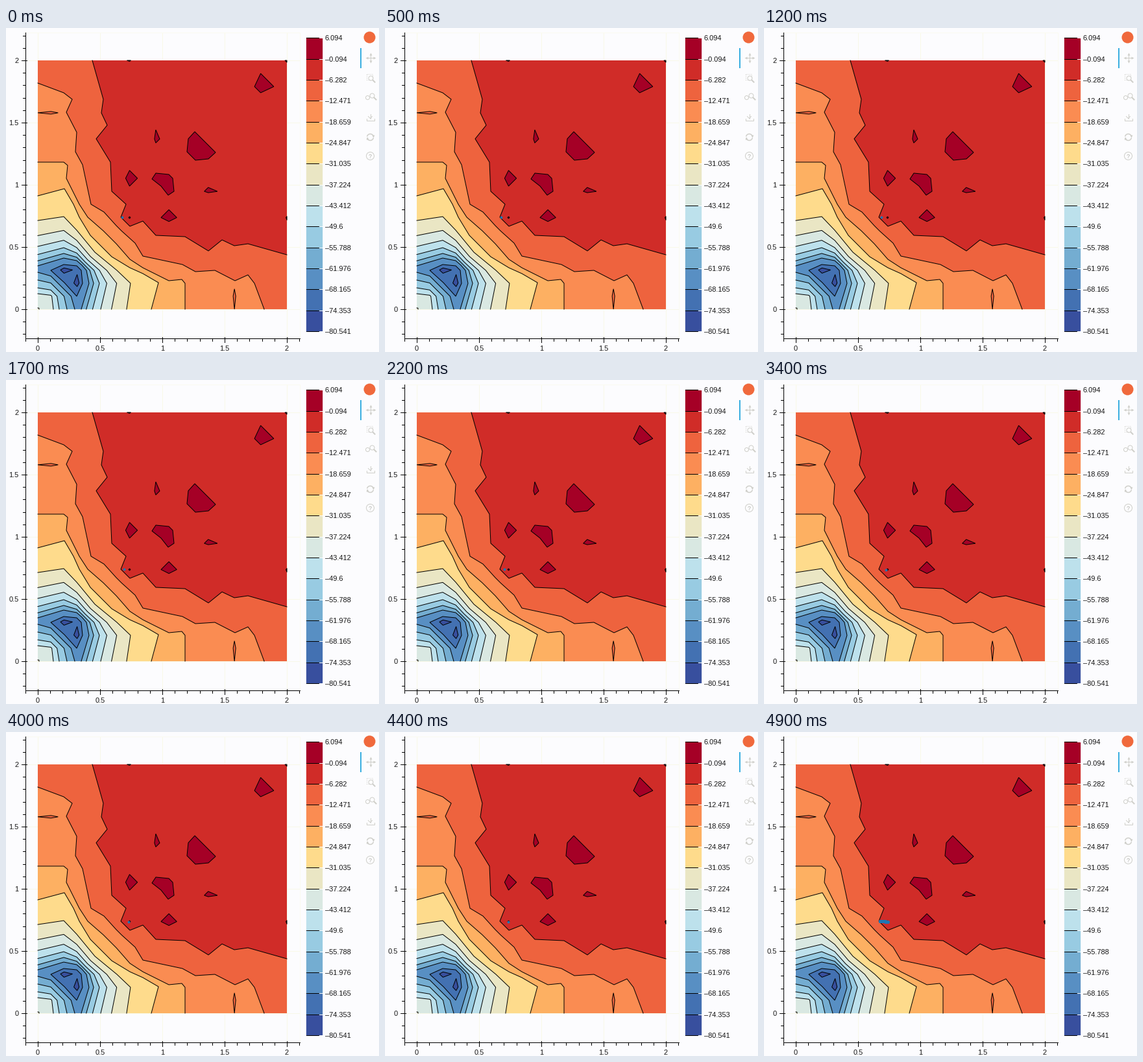
A matplotlib script that plays this animation: 575 by 500 pixels, repeating every 5 s.

```python
import numpy as np
import matplotlib.pyplot as plt
from matplotlib.animation import FuncAnimation
from matplotlib.patches import Circle, Polygon, Rectangle

W, H, DPI = 575, 500, 100
FRAMES, INTERVAL = 50, 100
PX = 72 / DPI
X0, Y0, SIZE = 48.5, 433.5, 384      # data origin and side of the plot in pixels
CELL = SIZE / 19                     # the field is sampled on 20 x 20 nodes
LOW, HIGH = -80.541, 6.094
LEVELS = np.linspace(LOW, HIGH, 15)
PALETTE = ("#384f9e #4371b2 #588fc3 #74add1 #98cbe2 #bde1ec #d9e8e2 "
           "#eae6c4 #fedb8c #fdb062 #fa8c52 #ee633e #d02c28 #a50026").split()
BACK, GREY, INK = "#fcfcfe", "#cfcfca", "#151515"

fig = plt.figure(figsize=(W / DPI, H / DPI), dpi=DPI, facecolor=BACK)
ax = fig.add_axes([0, 0, 1, 1])
ax.set_xlim(-0.5, W - 0.5)
ax.set_ylim(H - 0.5, -0.5)
ax.axis("off")


def line(xs, ys, color="black", width=1, z=3, **kw):
    ax.plot(xs, ys, color=color, lw=width * PX, zorder=z, **kw)


def label(x, y, text, ha, size=11, color=INK):
    ax.text(x, y, text, ha=ha, va="center_baseline", color=color,
            fontsize=size * PX, family="Liberation Sans", zorder=5)


def to_stage(points):
    """Offsets from the origin, y upwards, to stage pixels inside the plot."""
    points = np.clip(np.array(points, float), 0, SIZE)
    return np.column_stack([X0 + points[:, 0], Y0 - points[:, 1]])


def mirror(half):
    """Complete a path that is symmetric about the diagonal."""
    half = [tuple(p) for p in half]
    return half + [(y, x) for x, y in reversed(half)]


def blob(points, color_index):
    ax.add_patch(Polygon(to_stage(points), fc=PALETTE[color_index],
                         ec="black", lw=PX, zorder=2))


def contour(half, color_index):
    """Outline a symmetric level line and fill everything towards the origin."""
    path = mirror(half)
    inside = path + [(path[-1][0], 0), (0, 0), (0, path[0][1])]
    ax.add_patch(Polygon(to_stage(inside), fc=PALETTE[color_index], ec="none", zorder=2))
    line(*to_stage(path).T, z=2)


def kite(col, row, arms, color_index):
    """Level line around one node, and its twin across the diagonal."""
    up, right, down, left = np.array(arms) * CELL
    x, y = col * CELL, row * CELL
    points = [(x, y + up), (x + right, y), (x, y - down), (x - left, y)]
    blob(points, color_index)
    if col != row:
        blob([(b, a) for a, b in points], color_index)


# Grid and frame
for p in np.arange(5) * SIZE / 4:
    line([X0 + p] * 2, [6, 478], "#f8f8e8", z=1)
    line([29, 452], [Y0 - p] * 2, "#f8f8e8", z=1)
line([29, 452, 452], [6, 6, 478], "#fafaf0", z=1)

# Plateau and the ragged slopes around it, half of each line
ax.add_patch(Rectangle((X0, Y0 - SIZE), SIZE, SIZE, fc=PALETTE[12], ec="none", zorder=2))
contour([(84, 384), (101, 324), (98, 303), (107, 284), (90, 263), (112, 227),
         (114, 182), (136, 162), (128, 142)], 11)
contour([(0, 349), (40, 334), (53, 324), (44, 304), (60, 273), (58, 243),
         (69, 223), (82, 162), (102, 150), (121, 129)], 10)
contour([(0, 227), (40, 227), (46, 222), (44, 202), (64, 162), (77, 142),
         (101, 121)], 9)
contour([(0, 175), (41, 186), (55, 162), (64, 142), (81, 114)], 8)

# Inside the well the field falls off as 1/r along the axes
INNER = np.array([(0, 67), (40, 79), (60, 75), (68, 68)])
OUTER = np.array([(0, 137), (40, 143), (60, 122), (88, 88)])
for index in range(7, 1, -1):
    reach = 4330 / -LEVELS[index + 1]
    t = (reach - 69.9) / 69.7
    contour(INNER + t * (OUTER - INNER), index)

# It rises again towards the origin
for index, reach in enumerate((57, 45, 33, 24, 2), start=3):
    contour([(0, reach), (min(20, 0.9 * reach), 0.9 * reach)], index)

blob(mirror([(41, 41), (20, 60), (40, 69), (60, 67)]), 1)
kite(2, 3, (0.15, 0.65, 0.25, 0.27), 0)

# Isolated peaks
kite(1, 15, (0.1, 0.55, 0.1, 1), 11)
kite(17, 17, (1, 1, 0.47, 0.47), 13)
kite(9, 13, (0.7, 0.3, 0.3, 0.1), 13)
kite(7, 10, (0.6, 0.6, 0.6, 0.3), 13)
kite(7, 7, (0.07, 0.07, 0.07, 0.07), 13)
kite(7, 19, (0, 0.1, 0.07, 0.2), 13)
kite(19, 19, (0, 0, 0.15, 0.15), 13)
blob(mirror([(230, 243), (232, 263), (242, 274), (258, 258)]), 13)
blob(mirror([(190, 190), (176, 201), (182, 210), (202, 208)]), 13)

# Axes
line([29, 29], [6, 478])
line([29, 452], [478, 478])
for k in range(-2, 23):
    p = k * SIZE / 20
    major = k % 5 == 0
    if Y0 - p > 6:
        line([23 if major else 25, 31 if major else 29], [Y0 - p] * 2)
    if X0 + p < 452 and k > -2:
        line([X0 + p] * 2, [476 if major else 478, 484 if major else 482])
    if major and k >= 0:
        label(19, Y0 - p, f"{k / 10:g}", "right")
        label(X0 + p, 493, f"{k / 10:g}", "center")

# Colour bar
BAR_X, BAR_TOP, BAR_BOTTOM = 462.5, 14.7, 467.7
STEP = (BAR_BOTTOM - BAR_TOP) / 14
for i, color in enumerate(PALETTE):
    ax.add_patch(Rectangle((BAR_X, BAR_BOTTOM - (i + 1) * STEP), 24.5, STEP,
                           fc=color, ec=color, lw=0.2, zorder=2))
for i, value in enumerate(LEVELS):
    y = BAR_BOTTOM - i * STEP
    line([BAR_X, 482], [y, y])
    line([482, 487], [y, y], "white")
    label(491.5, y, f"{value:.3f}".rstrip("0").replace("-", "\u2013"), "left")


# Toolbar
def ring(x, y, r):
    ax.add_patch(Circle((x, y), r, fc="none", ec=GREY, lw=PX, zorder=3))


def lens(x, y):
    ring(x, y, 3.5)
    line([x + 3, x + 6], [y + 3, y + 6], GREY, 2)


ax.add_patch(Circle((560, 14), 9, fc="#f0693c", ec="none", zorder=3))
line([546, 546], [31, 60], "#3aaee0", 2)
line([555, 567], [45, 45], GREY)
line([561, 561], [39, 51], GREY)
for xs, ys, marker in (([555, 567], [45, 45], "<>"), ([561, 561], [39, 51], "^v")):
    for x, y, shape in zip(xs, ys, marker):
        line([x], [y], GREY, marker=shape, ms=4 * PX, mew=0)
line([555, 564, 564, 555, 555], [70, 70, 79, 79, 70], GREY, linestyle=":")
lens(562, 77)
lens(564, 104)
ring(557, 107, 3)
line([561, 561], [132, 139], GREY)
line([558, 561, 564], [136, 139, 136], GREY)
line([555, 555, 567, 567], [139, 142, 142, 139], GREY)
arc = np.radians(np.linspace(20, 160, 20))
for sign in (1, -1):
    xs, ys = 561 + 5 * sign * np.cos(arc), 168 - 5 * sign * np.sin(arc)
    line(xs, ys, GREY, 1.5)
    line([xs[0]], [ys[0]], GREY, marker="v" if sign > 0 else "^", ms=4 * PX, mew=0)
ring(561, 197, 6)
label(561, 197, "?", "center", 9, "#b4b4ae")

# The walker eases along; the final frame reveals every position it visited
t = np.arange(FRAMES) / (FRAMES - 1)
ease = t * t * (3 - 2 * t)
walk_x, walk_y = 178.3 + 11.7 * ease, 291.3 + ease
walker, = ax.plot([], [], "o", color="#1f77b4", mew=0, zorder=4)


def draw(i):
    last = i == FRAMES - 1
    shown = slice(None) if last else slice(i, i + 1)
    walker.set_data(walk_x[shown], walk_y[shown])
    walker.set_markersize((5 if last else 4) * PX)
    return walker,


anim = FuncAnimation(fig, draw, frames=FRAMES, interval=INTERVAL,
                     repeat=True, repeat_delay=0)
plt.show()
```
